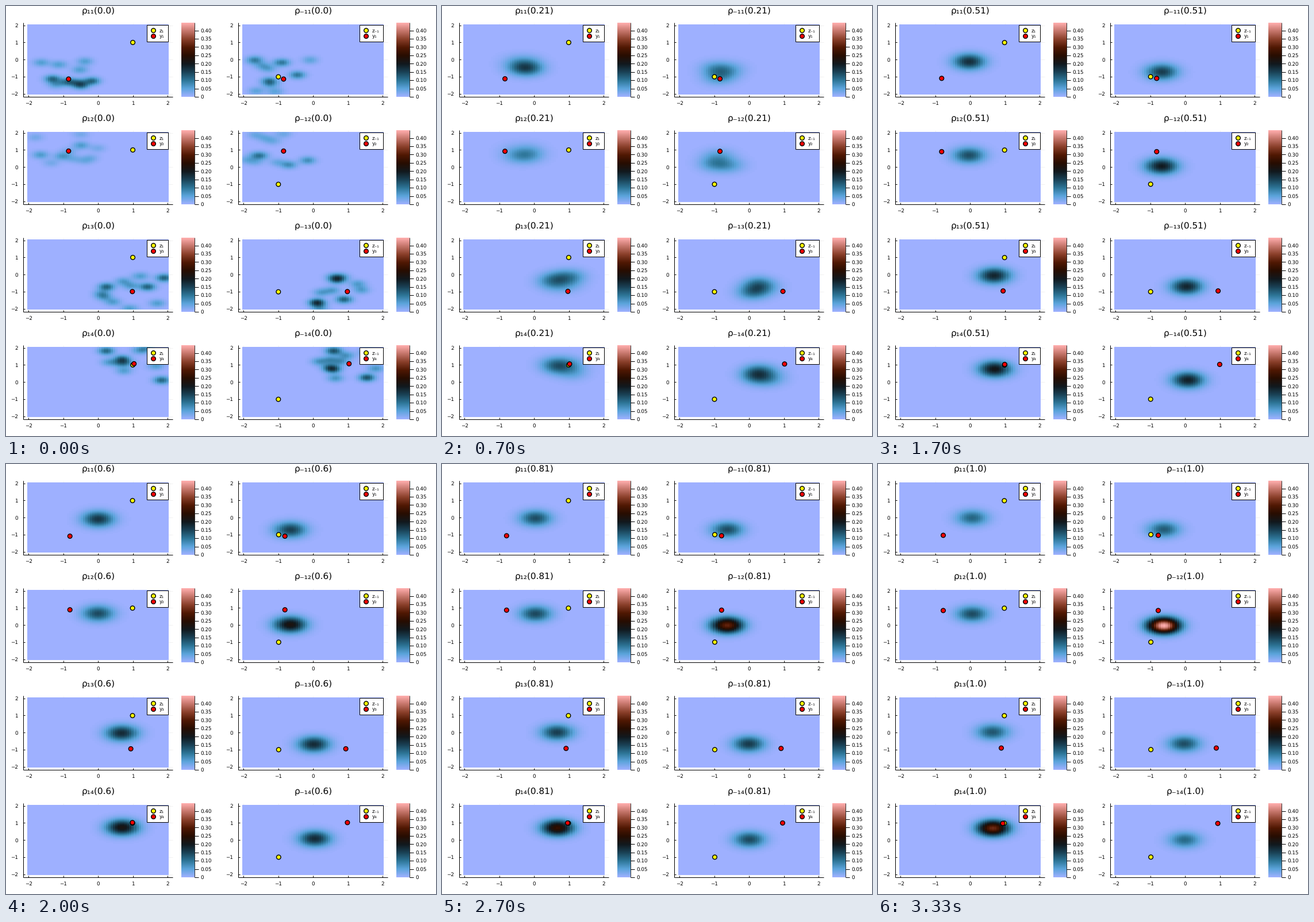
Animation, 748 px wide and 748 px high, one loop 3360 ms. Source, as a matplotlib script:

```python
import numpy as np
import matplotlib
import matplotlib.pyplot as plt
from matplotlib.animation import FuncAnimation
from matplotlib.colors import LinearSegmentedColormap
from matplotlib.patches import Circle, Rectangle

SIZE, DPI = 748, 64
STEPS, LOOP_MS = 101, 3360
PANEL_W, PANEL_H = 374, 187
X0, Y0 = 160.2, 93.3           # data origin inside a panel, in pixels
SX, SY = 60.4, 29.9            # pixels per data unit
LEFT, RIGHT, TOP, BOTTOM = 30, 290, 29, 158
V_MAX, V_STEP = 0.445, 14.43   # colour limit, pixels between colour ticks
YELLOW, RED = "#ffff00", "#ff0000"

GRID = np.linspace(-2, 2, 61)
EDGE = 2 + (GRID[1] - GRID[0]) / 2
RATE = 4.6                     # pull of the crowd towards its resting place
REST_PULL = 0.345              # the rest lies on this share of z + y
SIGMA_START, SIGMA_END = 0.16, 0.31
SCATTER = 8                    # loose particles around the dense spots
LEADER_STARTS = [(-0.85, -1.13), (-0.85, 0.935), (0.987, -0.985), (1.035, 1.07)]

matplotlib.rcParams["font.family"] = "DejaVu Sans"
matplotlib.rcParams["text.hinting"] = "none"
BERLIN = LinearSegmentedColormap.from_list("berlin_like", [
    "#9EB0FF", "#5BA4DB", "#2D7597", "#1A4256", "#11191E",
    "#280D01", "#501803", "#8A3F2A", "#C4756A", "#FFADAD"], N=256)


def px(length):
    """Pixels to points."""
    return length * 72 / DPI


fig = plt.figure(figsize=(SIZE / DPI, SIZE / DPI), dpi=DPI, facecolor="white")
ax = fig.add_axes([0, 0, 1, 1])
ax.axis("off")


def line(xs, ys, width=1.0, alpha=1.0, z=3):
    ax.plot(xs, ys, color="black", lw=px(width), alpha=alpha, zorder=z,
            solid_capstyle="butt")


def label(x, y, text, size=8.8, ha="center"):
    return ax.text(x, y, text, fontsize=px(size), ha=ha, va="baseline",
                   color="black", zorder=7)


def dot(x, y, color, z):
    return ax.add_patch(Circle((x, y), 3.8, facecolor=color, edgecolor="black",
                               lw=px(1.4), zorder=z))


def image(data, extent):
    return ax.imshow(data, cmap=BERLIN, vmin=0, vmax=V_MAX, extent=extent,
                     origin="lower", interpolation="nearest", aspect="auto",
                     zorder=1)


class Panel:
    """A crowd drawn to one z and one y point.

    spots are the densest places at the start, levels the crowd's
    strength at the start, the middle and the end.
    """

    def __init__(self, row, side, levels, spots):
        self.row, self.side = row, side
        self.ox = 0 if side > 0 else PANEL_W
        self.oy = row * PANEL_H
        self.sign = "" if side > 0 else "\u208b"
        self.index = chr(0x2081 + row)
        self.leader = np.array(LEADER_STARTS[row])
        self.growth = np.polyfit([0, 0.5, 1], np.log(levels), 2)

        rng = np.random.default_rng(10 * row + side + 1)
        quadrant = np.sign(self.leader)
        loose = quadrant * rng.uniform(0, 2, (SCATTER, 2))
        self.points = np.vstack([spots, spots, loose])
        self.draw_static()

    def pos(self, x, y):
        return self.ox + X0 + SX * x, self.oy + Y0 - SY * y

    def z_at(self, t):
        return self.side * (1 - 0.014 * t) * np.ones(2)

    def y_at(self, t):
        return self.leader * (1 - 0.09 * (0.6 * t + 0.4 * t * t))

    def density(self, t):
        decay = np.exp(-RATE * t)
        rest = REST_PULL * (self.z_at(t) + self.y_at(t))
        spots = rest + (self.points - rest) * decay
        var = SIGMA_END**2 + (SIGMA_START**2 - SIGMA_END**2) * decay**2
        gx, gy = (np.exp(-(GRID[:, None] - spots[:, i])**2 / (2 * var))
                  for i in (0, 1))
        level = np.exp(np.polyval(self.growth, t))
        return level * SIGMA_END**2 / var * (gy @ gx.T) / len(spots)

    def draw_static(self):
        ox, oy = self.ox, self.oy
        self.draw_axes(ox + LEFT, ox + RIGHT, oy + TOP, oy + BOTTOM)
        self.draw_colorbar(ox + 305.5, ox + 328, oy + TOP, oy + BOTTOM)
        x_lo, y_lo = self.pos(-EDGE, -EDGE)
        x_hi, y_hi = self.pos(EDGE, EDGE)
        self.heat = image(np.zeros((GRID.size, GRID.size)),
                          (x_lo, x_hi, y_lo, y_hi))
        self.z_dot = dot(0, 0, YELLOW, 4)
        self.y_dot = dot(0, 0, RED, 4.5)
        self.title = label(ox + 160.4, oy + 13.2, "", 15.3)
        self.draw_legend()

    def draw_axes(self, left, right, top, bottom):
        for v in range(-2, 3):
            x, y = self.pos(v, v)
            line([x, x], [top, bottom], 0.5, 0.1, 0)
            line([left, right], [y, y], 0.5, 0.1, 0)
            line([x, x], [bottom, bottom - 2.6])
            line([left, left + 2.6], [y, y])
            name = str(v).replace("-", "\u2212")
            label(x, bottom + 14, name)
            label(left - 9.5, y + 3.2, name, ha="right")
        line([left, left], [top, bottom])
        line([left, right], [bottom, bottom])

    def draw_colorbar(self, left, right, top, bottom):
        image(np.linspace(0, V_MAX, 256)[:, None], (left, right, bottom, top))
        line([right, right], [top, bottom], 0.8)
        for i in range(9):
            y = bottom - i * V_STEP
            line([right, right + 7], [y, y])
            label(right + 10, y + 3.2, f"{i * 0.05:.2f}" if i else "0",
                  ha="left")

    def draw_legend(self):
        left = self.ox + (245 if self.side > 0 else 241)
        top = self.oy + 33
        ax.add_patch(Rectangle((left, top), self.ox + 282 - left, 29,
                               facecolor="white", edgecolor="black",
                               lw=px(1), zorder=5))
        entries = [(YELLOW, f"z{self.sign}\u2081"), (RED, f"y{self.index}")]
        for i, (color, name) in enumerate(entries):
            y = top + 9.6 + 10 * i
            dot(left + 11.5, y, color, 6)
            label(left + 22, y + 3, name, ha="left")

    def update(self, t):
        self.heat.set_data(self.density(t))
        self.z_dot.center = self.pos(*self.z_at(t))
        self.y_dot.center = self.pos(*self.y_at(t))
        self.title.set_text(
            f"\u03c1{self.sign}\u2081{self.index}({round(t, 2)})")


panels = [
    Panel(0, 1, (0.21, 0.175, 0.115),
          [(-1.3, -1.13), (-0.5, -1.5), (-0.17, -1.25)]),
    Panel(0, -1, (0.18, 0.16, 0.125),
          [(-1.25, -1.25), (-0.45, -0.9), (-0.9, -0.18)]),
    Panel(1, 1, (0.115, 0.14, 0.14),
          [(-1.02, 0.62), (-1.65, 0.7), (-0.49, 1.25)]),
    Panel(1, -1, (0.14, 0.2, 0.445),
          [(-1.5, 0.65), (-0.7, 0.12), (-0.15, 0.38)]),
    Panel(2, 1, (0.22, 0.19, 0.13),
          [(0.25, -0.72), (1.42, -0.72), (1.9, -0.2)]),
    Panel(2, -1, (0.22, 0.187, 0.138),
          [(0.9, -1.45), (0.13, -1.65), (0.7, -0.31)]),
    Panel(3, 1, (0.21, 0.21, 0.32),
          [(0.24, 1.8), (0.7, 1.33), (1.83, 0.1)]),
    Panel(3, -1, (0.25, 0.195, 0.11),
          [(0.6, 1.8), (0.58, 0.74), (1.55, 0.25)]),
]
ax.set_xlim(0, SIZE)
ax.set_ylim(SIZE, 0)


def draw(step):
    t = step / (STEPS - 1)
    for panel in panels:
        panel.update(t)
    return []


anim = FuncAnimation(fig, draw, frames=STEPS, interval=LOOP_MS / STEPS,
                     repeat=True, repeat_delay=0, blit=False)
plt.show()
```
